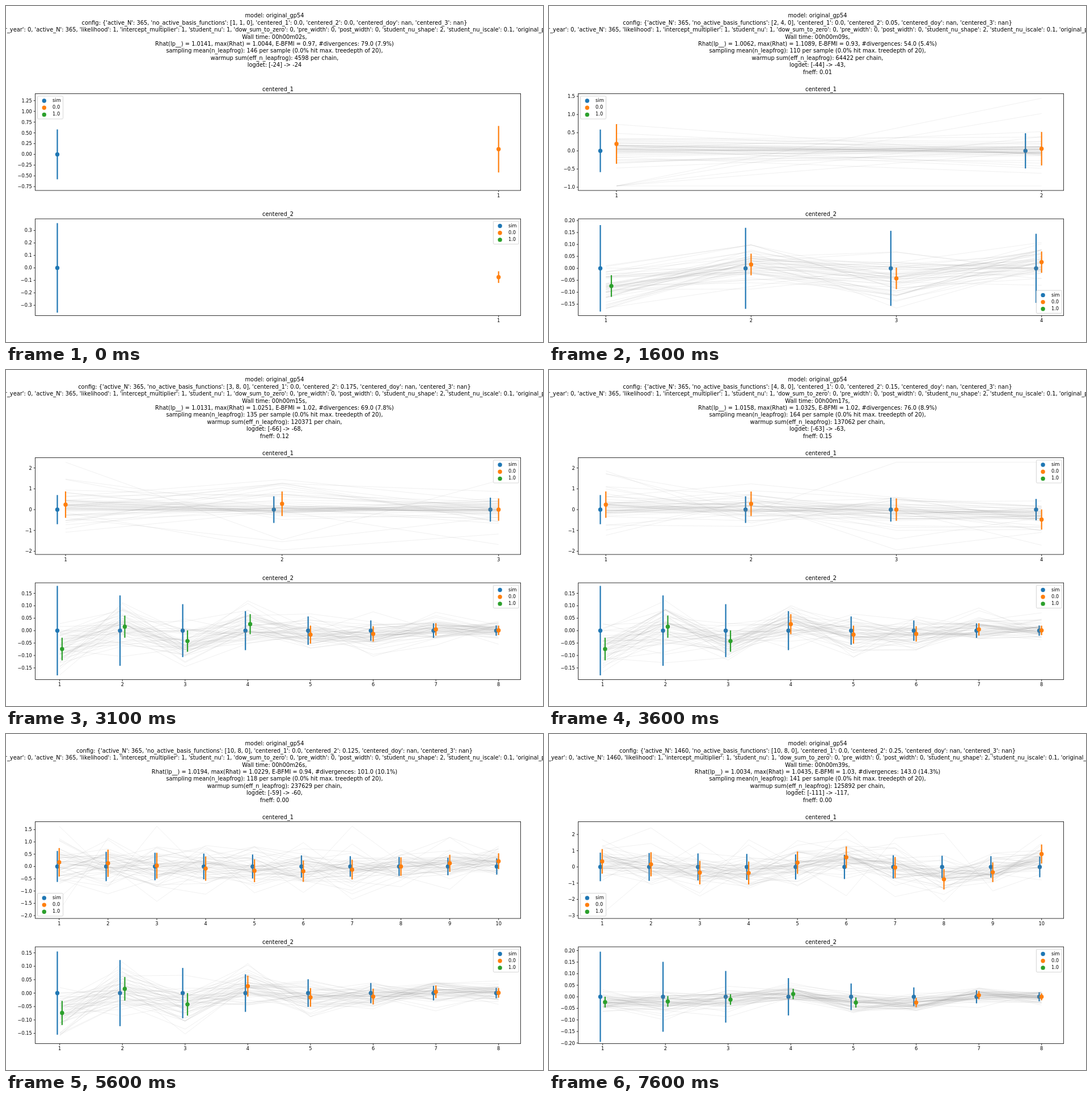
An HTML page with a canvas that plays this animation: 947 by 592 pixels, repeating every 8000 ms.

```html
<!DOCTYPE html>
<html>
<head>
<meta charset="utf-8">
<style>
html, body { margin: 0; width: 100%; height: 100%; overflow: hidden; background: #fff; }
canvas { display: block; }
</style>
</head>
<body>
<canvas id="stage" width="947" height="592"></canvas>
<script>
const ctx = document.getElementById('stage').getContext('2d');
const LEFT = 51.6, RIGHT = 907.6, HEIGHT = 170.5, TOPS = [154.5, 375];
const BLUE = '#1f77b4', ORANGE = '#ff7f0e', GREEN = '#2ca02c';
const BIG = 9.87, SMALL = 8.22, OFFSET = 0.038, CENTER = 473.5;

// Weekly coefficients, which drift towards the second shape as more data is used.
const WEEK = [-.074, .016, -.042, .026, -.016, -.013, .005, .001];
const WEEK_LATE = [-.023, -.02, -.012, .012, -.025, -.025, .007, 0];

const damped = (amp, period, shift, growth) =>
  i => amp * growth ** i * Math.cos(2 * Math.PI * (i - shift) / period);

// zero: height of the zero line, scale: pixels per unit, prior: widest bar, decay: how fast bars shrink
const axis = (zero, scale, prior, decay, wave) => ({ zero, scale, prior, decay, wave });
const stats = (N, share, wall, rhat, maxRhat, bfmi, div, pct, leap, warm, det1, det2, fneff) =>
  ({ N, share, wall, rhat, maxRhat, bfmi, div, pct, leap, warm, det1, det2, fneff });

const keys = [
  { at: 0, stats: stats(365, 0, 2, 1.0141, 1.0044, .97, 79, 7.9, 146, 4598, -24, -24, 0),
    axes: [axis(261.4, 75.75, .58, 0, damped(.12, 5, 0, 1)), axis(461.4, 219.7, .359, 0)] },
  { at: 4, stats: stats(365, .05, 9, 1.0062, 1.1089, .93, 54, 5.4, 110, 64422, -44, -43, .01),
    axes: [axis(255.2, 64, .586, .19, damped(.19, 5, 0, 1)), axis(462.2, 421, .181, .065)] },
  { at: 6, stats: stats(365, .2, 13, 1.0103, 1.0177, 1.01, 61, 6.7, 106, 103679, -69, -73, .09),
    axes: [axis(242.2, 78.6, .54, .166, damped(.2, 5, 0, 1)), axis(452.8, 415.7, .19, .25)] },
  { at: 8, stats: stats(365, .15, 17, 1.0158, 1.0325, 1.02, 76, 8.9, 164, 137062, -63, -63, .15),
    axes: [axis(246, 36.7, .7, .09, damped(.26, 6.4, .4, 1.3)), axis(459.2, 438, .18, .24)] },
  { at: 12, stats: stats(365, .125, 26, 1.0194, 1.0229, .94, 101, 10.1, 118, 237629, -59, -60, 0),
    axes: [axis(233.4, 43.3, .63, .054, damped(.17, 9.5, -.1, 1.03)), axis(456.5, 473, .155, .23)] },
  { at: 14, stats: stats(730, .225, 30, 1.0222, 1.0321, 1, 114, 11.4, 106, 148478, -71, -93, 0),
    axes: [axis(250, 66, .475, .069, damped(.12, 7.6, .3, 1)), axis(463, 442, .178, .245)] },
  { at: 16, stats: stats(1460, .25, 39, 1.0034, 1.0435, 1.03, 143, 14.3, 141, 125892, -111, -117, 0),
    axes: [axis(234.2, 28.6, .88, .027, damped(.35, 4.65, .15, 1.12)), axis(463, 407.5, .195, .255)] }
];

// Number of basis functions in each panel, growing step by step.
const COUNTS = [
  [1, 1, 1, 1, 2, 2, 2, 3, 4, 5, 6, 8, 10],
  [1, 2, 3, 4, 4, 6, 8]
];
// Legend corner per step: 0 upper left, 1 upper right, 2 lower left, 3 lower right.
const CORNERS = ['00000001111123122', '11133111111111111'];

const lerp = (a, b, t) => a + (b - a) * t;

function randomizer(seed) {
  return () => {
    seed = (seed + 0x6D2B79F5) | 0;
    let t = Math.imul(seed ^ (seed >>> 15), 1 | seed);
    t = (t + Math.imul(t ^ (t >>> 7), 61 | t)) ^ t;
    return ((t ^ (t >>> 14)) >>> 0) / 4294967296;
  };
}

function text(str, x, y, size, align = 'center') {
  ctx.font = size + 'px "DejaVu Sans", sans-serif';
  ctx.textAlign = align;
  ctx.fillStyle = '#000';
  ctx.fillText(str, x, y);
}

function line(x1, y1, x2, y2, color, width) {
  ctx.strokeStyle = color;
  ctx.lineWidth = width;
  ctx.beginPath();
  ctx.moveTo(x1, y1);
  ctx.lineTo(x2, y2);
  ctx.stroke();
}

function dot(x, y, color) {
  ctx.fillStyle = color;
  ctx.beginPath();
  ctx.arc(x, y, 3.7, 0, 7);
  ctx.fill();
}

function bar(x, y, half, color) {
  line(x, y - half, x, y + half, color, 2.2);
  dot(x, y, color);
}

function stateAt(step) {
  const next = keys.find(k => k.at >= step);
  const prev = keys[Math.max(0, keys.indexOf(next) - 1)];
  const mix = next.at > prev.at ? (step - prev.at) / (next.at - prev.at) : 1;
  const s = {};
  for (const name in next.stats) s[name] = lerp(prev.stats[name], next.stats[name], mix);
  s.N = Math.round(s.N);
  s.share = Math.floor(s.share * 40 + 1e-6) / 40;
  s.counts = COUNTS.map(list => list[Math.min(step, list.length - 1)]);
  s.axes = next.axes;
  return s;
}

function drawHeader(s, step) {
  const int = Math.round;
  const lines = [
    'model: original_gp54',
    `config: {'active_N': ${s.N}, 'no_active_basis_functions': [${s.counts.join(', ')}, 0], 'centered_1': 0.0, 'centered_2': ${s.share || '0.0'}, 'centered_doy': nan, 'centered_3': nan}`,
    '',
    `Wall time: 00h00m${String(int(s.wall)).padStart(2, '0')}s,`,
    `Rhat(lp__) = ${s.rhat.toFixed(4)}, max(Rhat) = ${s.maxRhat.toFixed(4)}, E-BFMI = ${s.bfmi.toFixed(2)}, #divergences: ${int(s.div)}.0 (${s.pct.toFixed(1)}%)`,
    `sampling mean(n_leapfrog): ${int(s.leap)} per sample (0.0% hit max. treedepth of 20),`,
    `warmup sum(eff_n_leapfrog): ${int(s.warm)} per chain,`,
    `logdet: [${int(s.det1)}] -> ${int(s.det2)}` + (step ? ',' : '')
  ];
  if (step) lines.push(`fneff: ${s.fneff.toFixed(2)}`);
  const lineY = i => 20.4 + i * 12.4;
  lines.forEach((str, i) => text(str, CENTER, lineY(i), BIG));

  // The long options line overflows both edges.
  const split = 513 + (String(s.N).length - 3) * 3.14;
  text(`r_year': 0, 'active_N': ${s.N}, 'likelihood': 1, 'intercept_multiplier': 1, 'student_nu': 1, 'dow_sum_to_zero': 0, `,
    split, lineY(2), BIG, 'right');
  text("'pre_width': 0, 'post_width': 0, 'student_nu_shape': 2, 'student_nu_iscale': 0.1, 'original_p",
    split, lineY(2), BIG, 'left');
}

function drawSamples(points, zero, top, seed, heavy) {
  const rand = randomizer(seed);
  const gauss = () => Math.sqrt(-2 * Math.log(1 - rand())) * Math.cos(2 * Math.PI * rand());
  // Few coefficients give many small draws and a handful of large ones.
  const tail = heavy ? 1.3 / Math.sqrt(points.length) : 0;
  ctx.strokeStyle = 'rgba(128,128,128,0.12)';
  ctx.lineWidth = 1;
  for (let n = 0; n < 50; n++) {
    const spread = Math.exp(tail * gauss() - tail * tail);
    ctx.beginPath();
    for (const { x, y, half } of points) {
      const draw = lerp(zero, y, Math.min(1, spread)) + gauss() * spread * half;
      ctx.lineTo(x, Math.max(top + 8, Math.min(top + HEIGHT - 8, draw)));
    }
    ctx.stroke();
  }
}

function drawLegend(corner, top) {
  const x = corner & 1 ? 859.4 : 55.6;
  const y = corner & 2 ? top + HEIGHT - 44.4 : top + 4.2;
  ctx.fillStyle = 'rgba(255,255,255,0.8)';
  ctx.strokeStyle = '#ccc';
  ctx.lineWidth = .8;
  ctx.beginPath();
  ctx.roundRect(x, y, 45, 40.3, 1.7);
  ctx.fill();
  ctx.stroke();
  [['sim', BLUE], ['0.0', ORANGE], ['1.0', GREEN]].forEach(([label, color], i) => {
    dot(x + 11.7, y + 8.3 + i * 12.2, color);
    text(label, x + 26.5, y + 10.4 + i * 12.1, SMALL, 'left');
  });
}

function drawAxes({ zero, scale }, row, n, xAt) {
  const top = TOPS[row], bottom = top + HEIGHT;
  const tick = [.05, .1, .25, .5, 1].find(size => size * scale > 18.6);
  const digits = (String(tick).split('.')[1] || '').length;
  const pitch = tick * scale;
  for (let k = Math.ceil((zero - bottom) / pitch); k <= (zero - top) / pitch; k++) {
    const y = zero - k * pitch;
    line(LEFT - 2.9, y, LEFT, y, '#000', .8);
    text((k < 0 ? '−' : '') + Math.abs(k * tick).toFixed(digits), LEFT - 5.8, y + 3, SMALL, 'right');
  }
  for (let i = 0; i < n; i++) {
    line(xAt(i), bottom, xAt(i), bottom + 2.9, '#000', .8);
    text(i + 1, xAt(i), bottom + 11.9, SMALL);
  }
  ctx.strokeStyle = '#000';
  ctx.lineWidth = .8;
  ctx.strokeRect(LEFT, top, RIGHT - LEFT, HEIGHT);
  text('centered_' + (row + 1), (LEFT + RIGHT) / 2, top - 4.9, BIG);
}

function drawPanel(s, row, step) {
  const ax = s.axes[row], n = s.counts[row], top = TOPS[row];
  const margin = (RIGHT - LEFT) / 22;
  const gap = (RIGHT - LEFT - 2 * margin) / (n - 1 + OFFSET);
  const xAt = i => RIGHT - margin - (n - 1 - i) * gap;
  const greens = row ? Math.round(s.share * 20) : 0;
  const late = Math.max(0, s.N / 730 - 1);
  const noise = row ? .047 * Math.sqrt(365 / s.N) : 1.5;

  const points = Array.from({ length: n }, (_, i) => {
    const prior = ax.prior * Math.exp(-ax.decay * i ** 1.13);
    const mean = row ? lerp(WEEK[i], WEEK_LATE[i], late) : ax.wave(i);
    // The data narrows the prior like two combined normal errors.
    const half = prior * noise / Math.hypot(prior, noise);
    return { x: xAt(i), y: ax.zero - mean * ax.scale, half: half * ax.scale, prior: prior * ax.scale };
  });

  points.forEach((p, i) => bar(xAt(i - OFFSET), ax.zero, p.prior, BLUE));
  drawSamples(points, ax.zero, top, 977 * step + 31 * row + 5, row === 0);
  points.forEach((p, i) => i < greens
    ? bar(xAt(i + OFFSET), p.y, p.half, GREEN)
    : bar(p.x, p.y, p.half, ORANGE));
  drawAxes(ax, row, n, xAt);
  drawLegend(+CORNERS[row][step], top);
}

let shown = -1;
function render(now) {
  const t = now % 8000;
  const step = t < 100 ? 0 : 1 + Math.floor((t - 100) / 500);
  if (step !== shown) {
    shown = step;
    ctx.fillStyle = '#fff';
    ctx.fillRect(0, 0, 947, 592);
    const state = stateAt(step);
    drawHeader(state, step);
    TOPS.forEach((_, row) => drawPanel(state, row, step));
  }
  requestAnimationFrame(() => render(performance.now() - start));
}
const start = performance.now();
render(0);
</script>
</body>
</html>
```
